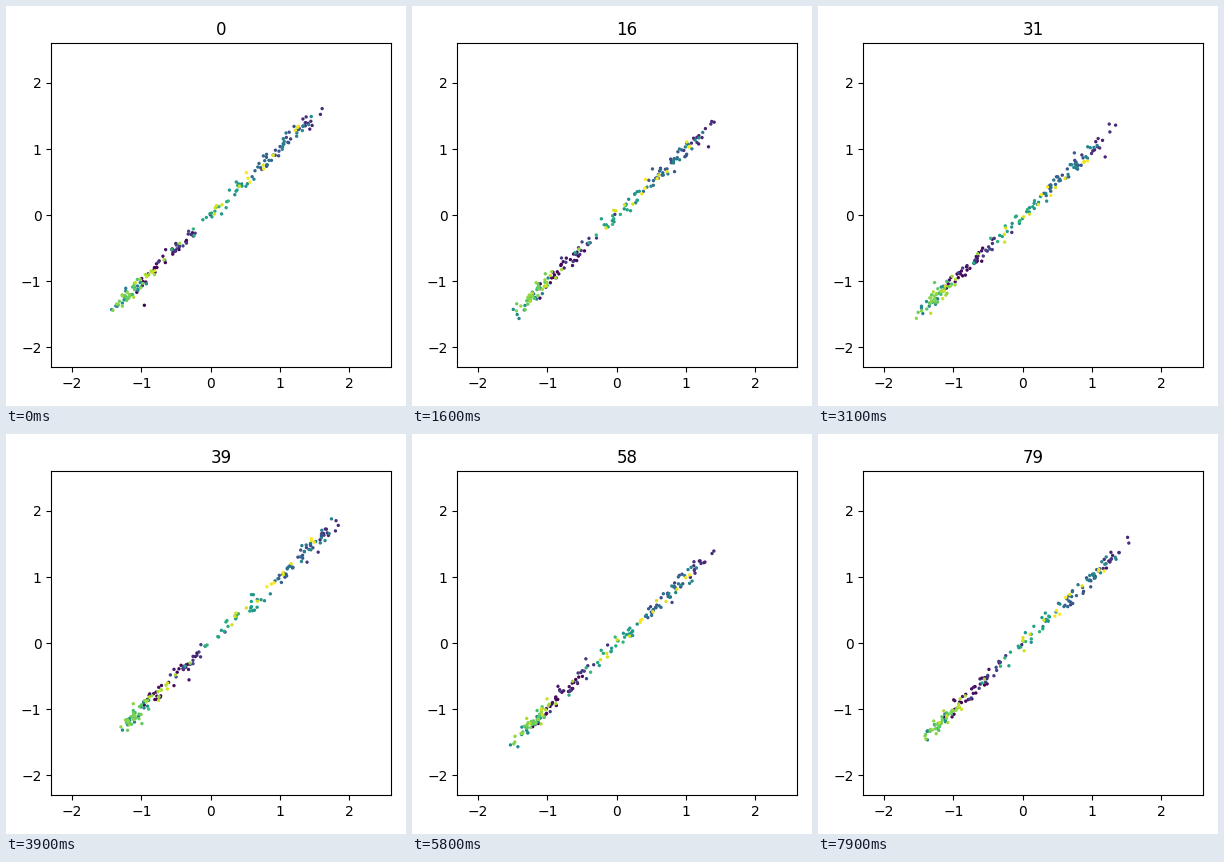
These frames come from a looping animation (400 by 400 pixels, 8 s). A matplotlib script:

```python
import matplotlib.pyplot as plt
import numpy as np
from matplotlib.animation import FuncAnimation

FRAMES, INTERVAL, GROUP_SIZE = 80, 100, 14
KEYS = [0, 16, 31, 46, 58, 66, 79]
SWING = [0, -.18, -.3, .73, -.23, -.5, -.08]

# colour, spread, level, share of the common swing
GROUPS = [
    (.01, .10, -.80, .3),
    (.04, .10, -.52, .5),
    (.12, .13, 1.40, 1),
    (.18, .18, -.35, .6),
    (.25, .14, 1.02, 1.1),
    (.33, .14, .87, 1),
    (.43, .23, 1.15, 1.2),
    (.46, .14, -1.08, .4),
    (.51, .15, .45, .9),
    (.63, .22, .04, .7),
    (.73, .11, -1.15, .25),
    (.79, .11, -1.23, .3),
    (.88, .22, -.90, .7),
    (.97, .50, .65, 1),
]


def build():
    rng = np.random.default_rng(7)
    k = np.arange(FRAMES)
    swing = np.interp(k, KEYS, SWING) + .75 * np.exp(-((k - 5) / 2.2) ** 2)
    colors, truth = [], []
    for mid, spread, level, share in GROUPS:
        colors.append(np.clip(rng.uniform(mid - .05, mid + .05, GROUP_SIZE), 0, 1))
        drift = level + share * swing
        truth.append(drift[:, None] + rng.normal(0, spread, GROUP_SIZE))
    x = np.hstack(truth)
    x += rng.normal(0, .04, x.shape)
    # mostly tight errors, with a few stray points
    error = rng.normal(0, .06, x.shape)
    error *= np.where(rng.random(x.shape) < .03, 3, 1)
    return np.concatenate(colors), np.stack([x, x + error], axis=-1)


colors, points = build()
order = np.argsort(colors)
colors, points = colors[order], points[:, order]

fig, ax = plt.subplots(figsize=(4, 4), dpi=100)
dots = ax.scatter(*points[0].T, c=colors, s=2, cmap="viridis", vmin=0, vmax=1)
ax.set_xlim(-2.3, 2.6)
ax.set_ylim(-2.3, 2.6)
title = ax.set_title("0")
fig.tight_layout()


def update(i):
    dots.set_offsets(points[i])
    title.set_text(str(i))
    return dots, title


anim = FuncAnimation(fig, update, frames=FRAMES, interval=INTERVAL,
                     repeat=True, repeat_delay=0)
plt.show()
```
